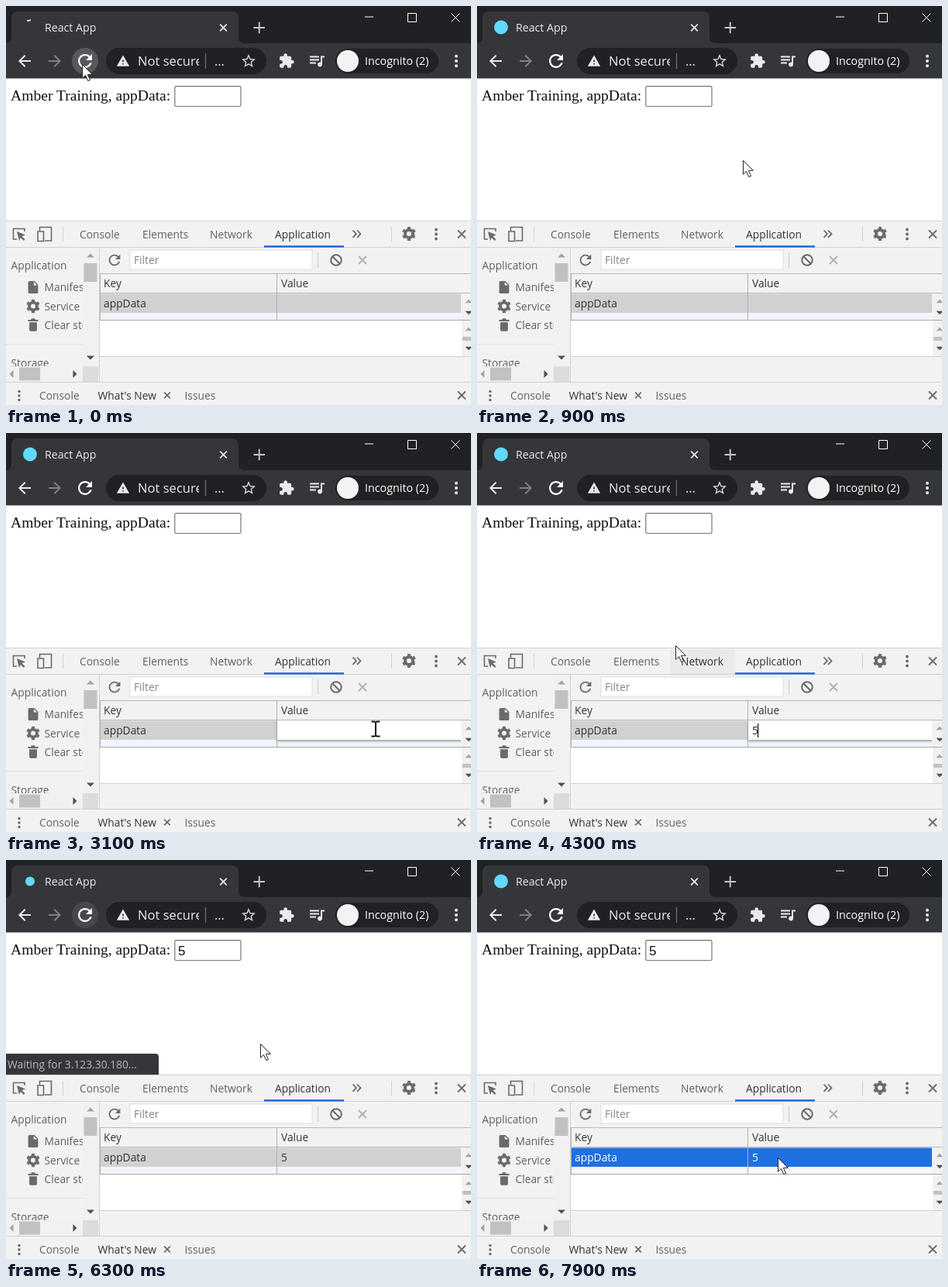
An HTML page for the animation above (8000 ms loop, 600 by 515 pixels).

```html
<!DOCTYPE html>
<html lang="en">
<head>
<meta charset="utf-8">
<title>Local storage demo</title>
<style>
  html, body { margin: 0; width: 100%; height: 100%; overflow: hidden; background: #fff; }
  svg { display: block; width: 100%; height: 100%; cursor: default; }
  text { font-family: "Open Sans", "Noto Sans", sans-serif; font-size: 13.8px; white-space: pre; }
  .page { font-family: "Liberation Serif", "Times New Roman", serif; font-size: 19.6px; }
  .field { font-family: "Liberation Sans", Arial, sans-serif; font-size: 17px; }
</style>
</head>
<body>
<svg id="stage" viewBox="0 0 600 515" xmlns="http://www.w3.org/2000/svg"></svg>
<script>
const LOOP = 8000, STEP = 100;
const GREY = '#5f6064', ICON = '#6a6a6a', LIGHT = '#e8eaed', PANEL = '#f3f2f2', RULE = '#d0d0d0';

// Icons on a 24 unit grid
const ICONS = {
  reload: 'M17.65 6.35C16.2 4.9 14.21 4 12 4c-4.42 0-7.99 3.58-7.99 8s3.57 8 7.99 8c3.73 0 6.84-2.55 7.73-6h-2.08c-.82 2.33-3.04 4-5.65 4-3.31 0-6-2.69-6-6s2.69-6 6-6c1.66 0 3.14.69 4.22 1.78L13 11h7V4z',
  back: 'M20 11H7.83l5.59-5.59L12 4l-8 8 8 8 1.41-1.41L7.83 13H20z',
  forward: 'M4 11h12.17l-5.59-5.59L12 4l8 8-8 8-1.41-1.41L16.17 13H4z',
  warning: 'M1 21h22L12 2zm12-3h-2v-2h2zm0-4h-2v-4h2z',
  star: 'M22 9.24l-7.19-.62L12 2 9.19 8.63 2 9.24l5.46 4.73L5.82 21 12 17.27 18.18 21l-1.63-7.03zM12 15.4l-3.76 2.27 1-4.28-3.32-2.88 4.38-.38L12 6.1l1.71 4.04 4.38.38-3.32 2.88 1 4.28z',
  puzzle: 'M20.5 11H19V7c0-1.1-.9-2-2-2h-4V3.5C13 2.12 11.88 1 10.5 1S8 2.12 8 3.5V5H4c-1.1 0-2 .9-2 2v3.8h1.5c1.49 0 2.7 1.21 2.7 2.7s-1.21 2.7-2.7 2.7H2V20c0 1.1.9 2 2 2h3.8v-1.5c0-1.49 1.21-2.7 2.7-2.7s2.7 1.21 2.7 2.7V22H17c1.1 0 2-.9 2-2v-4h1.5a2.5 2.5 0 0 0 0-5z',
  music: 'M15 6H3v2h12zm0 4H3v2h12zM3 16h8v-2H3zM17 6v8.18A3 3 0 1 0 19 17V8h3V6z',
  file: 'M14 2H6c-1.1 0-2 .9-2 2v16c0 1.1.9 2 2 2h12c1.1 0 2-.9 2-2V8zm-1 7V3.5L18.5 9z',
  trash: 'M6 8v12c0 1.1.9 2 2 2h8c1.1 0 2-.9 2-2V8zM20 4h-4.5l-1-2h-5l-1 2H4v2.4h16z'
};

const rect = (x, y, w, h, fill, extra = '') =>
  `<rect x="${x}" y="${y}" width="${w}" height="${h}" fill="${fill}" ${extra}/>`;
const text = (x, y, s, fill = GREY, extra = '') => `<text x="${x}" y="${y}" fill="${fill}" ${extra}>${s}</text>`;
const path = (d, stroke, w = 1, extra = '') =>
  `<path d="${d}" fill="none" stroke="${stroke}" stroke-width="${w}" ${extra}/>`;
const disc = (x, y, r, fill, extra = '') => `<circle cx="${x}" cy="${y}" r="${r}" fill="${fill}" ${extra}/>`;
const icon = (name, x, y, k, fill) =>
  `<path d="${ICONS[name]}" fill="${fill}" fill-rule="evenodd" transform="translate(${x} ${y}) scale(${k}) translate(-12 -12)"/>`;
const cross = (x, y, r, color, w) =>
  path(`M${x - r} ${y - r}l${2 * r} ${2 * r}m0 ${-2 * r}l${-2 * r} ${2 * r}`, color, w);
const dots = (x, y, gap, r, fill) => [-1, 0, 1].map(i => disc(x, y + i * gap, r, fill)).join('');
const gear = (x, y, r) =>
  disc(x, y, r * .56, 'none', `stroke="${ICON}" stroke-width="${r * .44}"`) +
  disc(x, y, r * .86, 'none', `stroke="${ICON}" stroke-width="${r * .28}" pathLength="12" stroke-dasharray="1 1" transform="rotate(15 ${x} ${y})"`);
// Scroll arrow, turned in degrees from pointing up
const tri = (x, y, turn, fill, r = 5) =>
  `<path d="M${-r} ${r / 2}L0 ${-r / 2}L${r} ${r / 2}z" fill="${fill}" transform="translate(${x} ${y}) rotate(${turn})"/>`;

function browser() {
  return rect(0, 0, 600, 94, '#202124') +
    '<path d="M0 48Q7 48 7 40V16Q7 7 16 7H291Q300 7 300 16V40Q300 48 308 48H600V94H0z" fill="#35363a"/>' +
    '<g id="favicon"></g>' +
    text(50, 33, 'React App', LIGHT, 'style="font-size:14.2px"') +
    cross(280.5, 28, 4.3, LIGHT, 1.8) +
    path('M319.5 28h14.5m-7.25-7.25v14.5', '#c5c7ca', 1.9) +
    path('M463 14h11M518.5 9.5h11v11h-11zM574.5 9.5l11 11m0-11l-11 11', '#fff') +
    icon('back', 24, 71, 1, LIGHT) + icon('forward', 63, 71, 1, '#7f8184') +
    disc(102, 71, 17, '#505155', 'id="hover"') + icon('reload', 102, 71, 1.12, '#fff') +
    rect(129, 54, 207, 34, '#202124', 'rx="17"') +
    icon('warning', 151, 71, .74, LIGHT) +
    '<clipPath id="addr"><path d="M165 54h84v34h-84z"/></clipPath>' +
    text(170, 77, 'Not secure', LIGHT, 'style="font-size:16.6px" clip-path="url(#addr)"') +
    path('M257.5 61v20', '#6c6e72', 1.3) +
    text(269, 77, '...', LIGHT, 'style="font-size:16px"') +
    icon('star', 313, 71, .9, '#d0d2d5') + icon('puzzle', 362, 71, .88, LIGHT) + icon('music', 401, 70.5, 1, LIGHT) +
    rect(425, 55, 133, 32, '#202124', 'rx="16"') + disc(441, 71, 14, '#f1f3f4') +
    text(463, 76, 'Incognito (2)', '#fff', 'style="font-size:14.3px"') +
    dots(581, 71, 6.3, 2, LIGHT);
}

function page() {
  return rect(0, 93.5, 600, 184.5, '#fffffe') +
    text(6, 122, 'Amber Training, appData:', '#111', 'class="page"') +
    rect(217.8, 103.7, 85.2, 25.8, '#fff', 'rx="1.5" stroke="#767676" stroke-width="1.2"') +
    text(222, 122.5, '5', '#111', 'class="field" id="fieldValue"') +
    '<g id="bubble"><path d="M0 250H193Q197 250 197 254V278H0z" fill="#35363a"/>' +
    text(2, 269, 'Waiting for 3.123.30.180...', '#b4b8bd') + '</g>';
}

function toolbar() {
  return rect(0, 278, 600, 237, PANEL) + path('M0 277.5H600', RULE) +
    rect(249, 279, 84, 32, '#eaeaea', 'id="tabHover"') + path('M0 311.5H600', RULE) +
    path('M14 301H9.5V287.5H24V291', ICON, 1.6) +
    `<path d="M14 291l11 4.5-4.5 1.8 4 4-1.7 1.7-4-4-1.8 4.2z" fill="${ICON}"/>` +
    path('M43.5 290V285.5H58.5V303H50M41 291H48.5V303.5H41z', ICON, 1.6) +
    path('M73.5 285v19M497.5 285v19', RULE) +
    text(95, 300, 'Console') + text(176, 300, 'Elements') + text(263, 300, 'Network', GREY, 'id="netTab"') +
    text(347, 300, 'Application', '#333') + rect(333, 309.2, 103, 2.4, '#1a68d8') +
    path('M447.5 289.5l4.5 4.7-4.5 4.7m5.5-9.4l4.5 4.7-4.5 4.7', ICON, 1.8) +
    gear(520, 294, 9) + dots(555, 294.5, 6, 1.9, ICON) + cross(588, 294.5, 5, ICON, 1.8);
}

function sidebar() {
  return '<clipPath id="side"><path d="M0 312h99v153H0z"/></clipPath><g clip-path="url(#side)">' +
    text(6.5, 339.5, 'Application') + text(49.5, 368, 'Manifest') + text(49.5, 393, 'Service Workers') +
    text(49.5, 417, 'Clear storage') + path('M0 436.5H99', '#e0e0e0') + text(6.5, 465.5, 'Storage') + '</g>' +
    icon('file', 35, 363, .8, ICON) + gear(35, 387.5, 8.8) + icon('trash', 35, 411.5, .82, ICON) +
    rect(99, 312, 20, 153, '#f1f1f1') + rect(100.5, 332, 17, 24, '#c1c1c1') +
    tri(109, 322, 0, '#a3a3a3') + tri(109, 454, 180, '#505050') +
    rect(0, 465, 99, 20, '#f1f1f1') + rect(17, 466.5, 27, 17, '#c1c1c1') +
    tri(7, 475, -90, '#a3a3a3') + tri(89, 475, 90, '#505050') +
    rect(99, 465, 20, 20, '#dcdcdc') + path('M120.5 312V485', RULE);
}

function table() {
  return icon('reload', 140, 328, .92, ICON) +
    rect(160, 315, 235, 25, '#fff', 'stroke="#dedede"') + text(165, 333, 'Filter', '#80868b') +
    path('M402.5 318v20', RULE, 1.2) +
    disc(426, 328, 6.8, 'none', `stroke="${ICON}" stroke-width="2"`) + path('M421.2 323.2l9.6 9.6', ICON, 2) +
    cross(460, 328, 5, '#b5b5b5', 2.2) +
    path('M121 345.5H600M121 370.5H600', '#b8b8b8') +
    text(126, 363, 'Key', '#333') + text(355, 363, 'Value', '#333') +
    rect(121, 396, 467, 9, '#f1f5fb', 'id="strip"') + rect(121, 371.5, 466, 24.5, '#d1d1d1', 'id="row"') +
    path('M121.5 345V405M349.5 345V405', '#b0b0b0') +
    text(126, 389, 'appData', '#333', 'id="key"') + text(355, 389, '5', '#333', 'id="value"') +
    rect(121, 406, 467, 46, '#fffffe') +
    '<clipPath id="cell"><path d="M345 371h242v34h-242z"/></clipPath>' +
    '<filter id="blur"><feGaussianBlur stdDeviation="1.6"/></filter>' +
    '<g id="editor" clip-path="url(#cell)">' +
    rect(350, 373, 245, 25, '#666', 'opacity=".6" filter="url(#blur)"') + rect(350, 371, 240, 25, '#fff') +
    text(355, 389, '5', '#222', 'id="typed"') + rect(362, 375, 1.2, 18, '#111', 'id="caret"') + '</g>' +
    rect(588, 371, 12, 34, '#f1f1f1') + rect(588, 406, 12, 46, '#f1f1f1') + rect(589, 427, 11, 5, '#c1c1c1') +
    [[381, 0], [396, 180], [417, 0], [442, 180]].map(([y, a]) => tri(597, y, a, a ? '#505050' : '#a3a3a3', 4.5)).join('') +
    path('M121 405.5H600', '#a8a8a8') + path('M121 452.5H600', RULE);
}

function drawer() {
  return rect(0, 486, 600, 29, PANEL) + path('M0 485.5H600', RULE) +
    dots(17, 503, 5.5, 1.7, ICON) + text(43, 508, 'Console') + text(118.5, 508, "What's New", '#333') +
    cross(208, 502.5, 3.8, ICON, 1.7) + text(230.5, 508, 'Issues') + cross(588, 502.5, 5, ICON, 1.8);
}

const pointers =
  '<path id="arrow" d="M.5 .5V18.2L4.5 14.4L7.8 21.7L10.5 20.5L7.4 13.3H13.3z" fill="#fff" stroke="#222"/>' +
  '<g id="ibeam">' + path('M-5.5 -9.5H-1.5L0 -8.5L1.5 -9.5H5.5M-5.5 9.5H-1.5L0 8.5L1.5 9.5H5.5M0 -8.5V8.5', '#111', 2) + '</g>';

const stage = document.getElementById('stage');
stage.innerHTML = browser() + page() + toolbar() + sidebar() + table() + drawer() + pointers;
const $ = id => document.getElementById(id);
const show = (id, on) => $(id).setAttribute('visibility', on ? 'visible' : 'hidden');
const paint = (id, fill) => $(id).setAttribute('fill', fill);

// Pointer stops: time, x, y
const STOPS = [
  [0, 98, 75], [200, 100, 77], [900, 343, 199], [1000, 343, 199], [1600, 446, 391], [2000, 477, 382],
  [3600, 477, 382], [4300, 256, 274], [4700, 180, 180], [5200, 132, 123], [5500, 100, 76], [5800, 100, 76],
  [6300, 328, 237], [6900, 400, 382], [7200, 395, 401], [7400, 392, 410], [7700, 388, 384], [8000, 388, 384]
];
const RELOADS = [0, 5700];
const SELECTS = [[2100, 2500], [7500, 8000]];
const EDIT = [2500, 4700], TYPED = 3300, FILLED = 6100;
const within = (t, [a, b]) => t >= a && t < b;

function pointerAt(t) {
  const i = STOPS.findIndex(s => s[0] > t);
  const [a, b] = [STOPS[i - 1], STOPS[i]];
  const u = (t - a[0]) / (b[0] - a[0]), e = u * u * (3 - 2 * u);
  return [a[1] + (b[1] - a[1]) * e, a[2] + (b[2] - a[2]) * e];
}

function favicon(age) {
  if (age >= 400) return disc(31, 27.5, age < 800 ? 6 : 9, '#61dafb');
  const len = 5 + age / 12;
  return disc(31, 27.5, 9, 'none',
    `stroke="#dfe1e5" stroke-width="2" stroke-dasharray="${len} 60" transform="rotate(${-116 - age * .7} 31 27.5)"`);
}

function draw(t) {
  const age = t - RELOADS.filter(r => r <= t).pop();
  const editing = within(t, EDIT), selected = SELECTS.some(s => within(t, s));
  const [x, y] = pointerAt(t);
  const overText = x < 213 && y > 104 && y < 130;
  const overCell = editing && x > 350 && y > 371 && y < 396;
  const beam = overText || overCell;

  $('favicon').innerHTML = favicon(age);
  show('hover', age < 700 || within(t, [5500, 5700]));
  paint('hover', age < 400 ? '#58595d' : '#47484c');
  show('bubble', within(age, [400, 800]));
  show('fieldValue', t >= FILLED);

  const netHover = within(t, [4100, 4400]);
  show('tabHover', netHover);
  paint('netTab', netHover ? '#333' : GREY);

  paint('row', selected ? '#2071e0' : '#d1d1d1');
  paint('strip', selected ? '#f6f6f6' : '#f1f5fb');
  paint('key', selected ? '#fff' : '#333');
  paint('value', selected ? '#fff' : '#333');
  show('value', t >= EDIT[1]);
  show('editor', editing);
  show('typed', editing && t >= TYPED);
  const typed = t >= TYPED;
  show('caret', editing && (t - (typed ? TYPED : EDIT[0])) % 1000 < 500);
  $('caret').setAttribute('x', typed ? 362 : 355);

  show('arrow', !beam);
  show('ibeam', beam);
  $(beam ? 'ibeam' : 'arrow').setAttribute('transform', `translate(${x.toFixed(1)} ${y.toFixed(1)})`);
}

const start = performance.now();
function tick() {
  const t = (performance.now() - start) % LOOP;
  draw(Math.floor(t / STEP) * STEP);
  requestAnimationFrame(tick);
}
tick();
</script>
</body>
</html>
```
